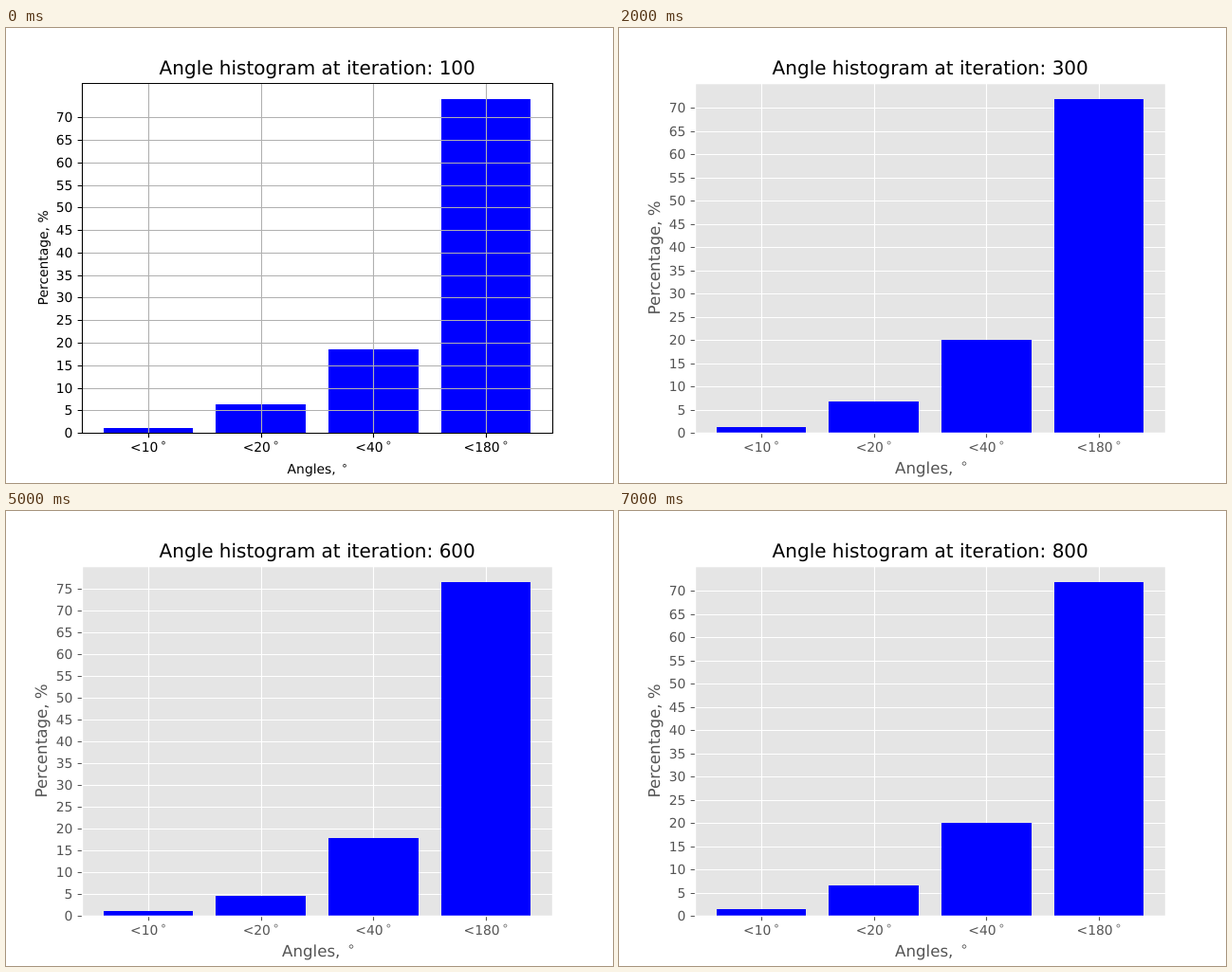
An HTML page that plays this animation: 640 by 480 pixels, repeating every 8000 ms.

```html
<!DOCTYPE html>
<html lang="en">
<head>
<meta charset="utf-8">
<title>Angle histogram</title>
<style>
html, body { margin: 0; width: 100%; height: 100%; overflow: hidden; background: #fff; }
svg { display: block; width: 640px; height: 480px; font-family: "DejaVu Sans", sans-serif; text-rendering: geometricPrecision; }
.chart { visibility: hidden; animation: show 8s step-end infinite; }
@keyframes show {
  0% { visibility: visible; }
  12.5%, 100% { visibility: hidden; }
}
</style>
</head>
<body>
<svg id="stage" viewBox="0 0 640 480"></svg>
<script>
const LEFT = 80, RIGHT = 576, TOP = 57.6, BOTTOM = 427.2;
const UNIT = (RIGHT - LEFT) / 4.18;      // four bars 0.8 wide plus 5% margins
const LIMITS = [10, 20, 40, 180];

// Percentages of the first three bars; the last takes the rest.
const SERIES = [
  [1.1, 6.35, 18.55],
  [1.07, 6.6, 19.8],
  [1.35, 6.75, 20.1],
  [1.65, 6.9, 20.4],
  [1.8, 7.95, 20.6],
  [1.13, 4.6, 17.85],
  [1.3, 5.6, 19],
  [1.47, 6.58, 20.1]
];

const PLAIN = { face: '#fff', grid: '#b0b0b0', edge: '#000', edgeWidth: 1.11, ink: '#000',
                label: 13.89, labelX: 296.6, ringX: 357, ringY: 461.7, yBase: 44, gridOnTop: true };
const SHADED = { face: '#e5e5e5', grid: '#fff', edge: '#fff', edgeWidth: 1.39, ink: '#555',
                 label: 16.67, labelX: 291, ringX: 364, ringY: 459.5, yBase: 43, gridOnTop: false };

const snap = v => Math.round(v) + 0.5;
const rect = (x0, y0, x1, y1, attrs) =>
  `<rect x="${x0}" y="${y0}" width="${x1 - x0}" height="${y1 - y0}" ${attrs}/>`;
const path = (d, color, width = 1.11) =>
  `<path d="${d}" fill="none" stroke="${color}" stroke-width="${width}"/>`;
const text = (x, y, str, size, color, anchor = 'start', extra = '') =>
  `<text x="${x}" y="${y}" font-size="${size}" fill="${color}" text-anchor="${anchor}" ${extra}>${str}</text>`;
const ring = (x, y, size, color) =>
  `<circle cx="${x}" cy="${y}" r="${size * 0.108}" fill="none" stroke="${color}" stroke-width="${size * 0.055}"/>`;

function chart(parts, i) {
  const s = i ? SHADED : PLAIN;
  const values = [...parts, 100 - parts.reduce((a, b) => a + b)];
  const max = Math.max(...values);
  const yOf = v => BOTTOM - v / (max * 1.05) * (BOTTOM - TOP);
  const xOf = k => LEFT + (k + 0.59) * UNIT;

  let bars = '', grid = '', ticks = '', labels = '';
  values.forEach((v, k) => {
    const c = xOf(k), x = snap(c), wide = LIMITS[k] > 99 ? 4.4 : 0;
    bars += rect(Math.round(c - 0.4 * UNIT), Math.round(yOf(v)),
                 Math.round(c + 0.4 * UNIT), 427, 'fill="#00f"');
    grid += `M${x} 58V427`;
    ticks += `M${x} 427.5v4.86`;
    labels += text(c - 19 - wide, 447, '&lt;' + LIMITS[k], 13.89, s.ink)
            + ring(c + 16 + wide, 437.6, 13.89, s.ink);
  });
  for (let v = 0; v < max; v += 5) {
    const y = snap(yOf(v));
    grid += `M80 ${y}H576`;
    ticks += `M80.5 ${y}h-4.86`;
    labels += text(70.3, y + 4.5, v, 13.89, s.ink, 'end');
  }
  const lines = path(grid, s.grid);

  return `<g class="chart" style="animation-delay:${i - 8}s">`
    + rect(80, 58, 576, 427, `fill="${s.face}"`)
    + (s.gridOnTop ? bars + lines : lines + bars)
    + path(ticks, s.ink)
    + path('M80.5 58.5H576.5V427.5H80.5Z', s.edge, s.edgeWidth)
    + labels
    + text(328.2, 49, `Angle histogram at iteration: ${(i + 1) * 100}`, 20, '#000', 'middle')
    + text(s.labelX, 470, 'Angles,', s.label, s.ink)
    + ring(s.ringX, s.ringY, s.label, s.ink)
    + text(0, 0, 'Percentage, %', s.label, s.ink, 'middle',
           `transform="translate(${s.yBase} 242.4) rotate(-90)"`)
    + '</g>';
}

document.getElementById('stage').innerHTML = SERIES.map(chart).join('');
</script>
</body>
</html>
```
